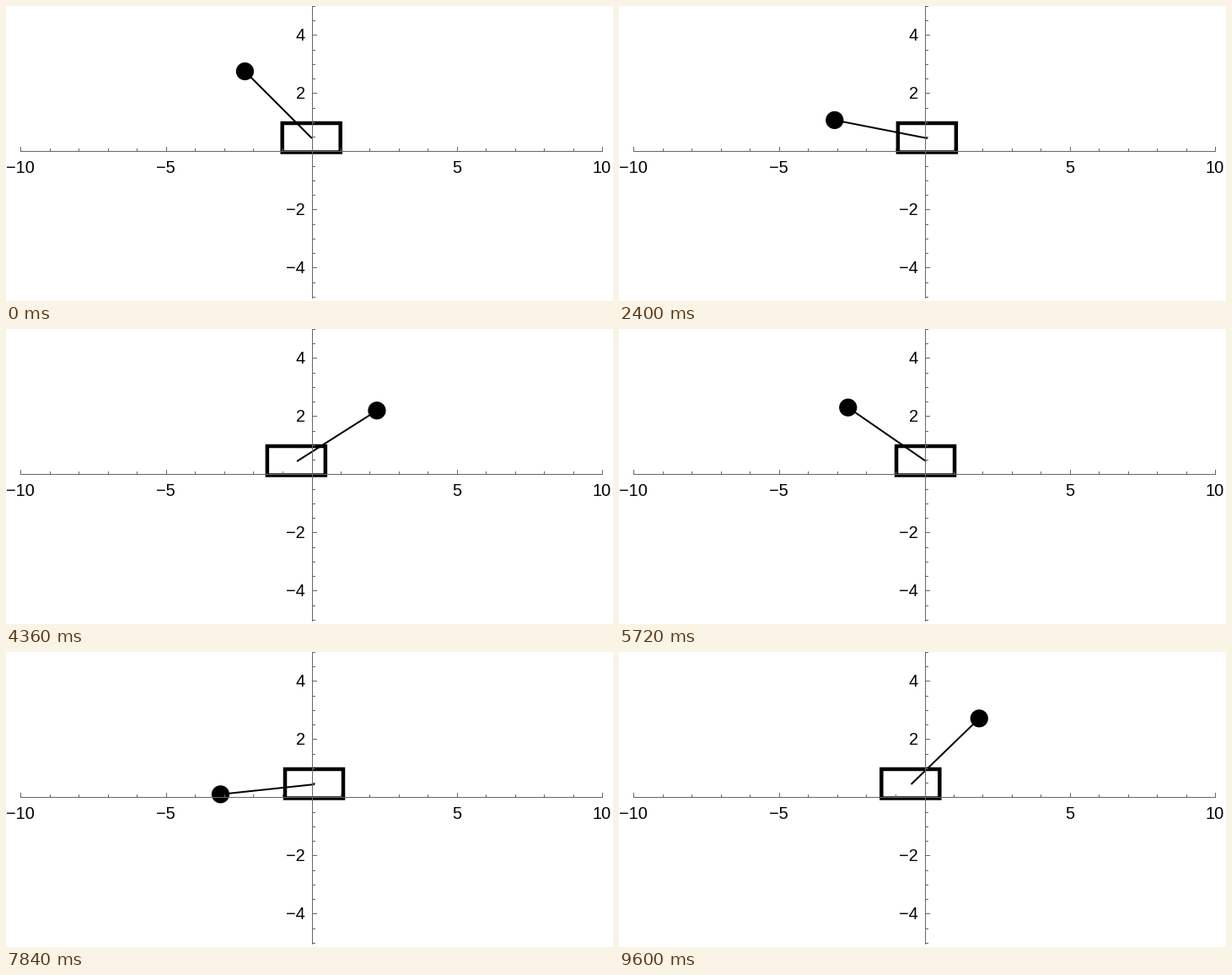
These frames come from a looping animation (720 px wide and 350 px high, 9.64 s). A matplotlib script:

```python
import numpy as np
import matplotlib.pyplot as plt
from matplotlib.animation import FuncAnimation
from matplotlib.patches import Circle, Rectangle

W, H, DPI = 720, 350, 100
PX = 72 / DPI                 # points per pixel
FRAMES, STEP = 241, 40
UNIT = 34.5                   # pixels per axis unit
OX, OY = 362.6, 172.9         # origin of the ticks in pixels
AXIS_X, AXIS_Y = 363.5, 172.5
GRAY = "0.4"

# Pendulum on a free cart, released at rest 45 degrees above the left horizon
MASS_RATIO = 1 / 3            # bob mass / total mass
AMP = np.radians(135)
PERIOD = 2760
SHIFT = UNIT * MASS_RATIO     # cart travel for a pendulum of unit length
LENGTH = 112.4                # drawn rod length
PIVOT_X, PIVOT_Y = 362.9, 157
BOB_R = 10.6
BOX_X, BOX_Y = 362.2, 173.5   # cart's bottom centre at the start


def swing_table(n=4000):
    """Time and angle over one full swing, from energy conservation."""
    psi = np.linspace(-np.pi / 2, 3 * np.pi / 2, n)
    s = np.sin(AMP / 2) * np.sin(psi)
    theta = 2 * np.arcsin(s)
    rate = np.sqrt((1 - MASS_RATIO * np.cos(theta) ** 2) / (1 - s ** 2))
    t = np.concatenate([[0], np.cumsum((rate[1:] + rate[:-1]) / 2)])
    return t / t[-1] * PERIOD, theta


TIMES, ANGLES = swing_table()

fig = plt.figure(figsize=(W / DPI, H / DPI), dpi=DPI, facecolor="white")
ax = fig.add_axes([0, 0, 1, 1])
ax.set_xlim(0, W)
ax.set_ylim(H, 0)
ax.axis("off")


def thin_line(x0, y0, x1, y1):
    ax.plot([x0, x1], [y0, y1], color=GRAY, lw=PX, zorder=5,
            solid_capstyle="butt", snap=False)


def label(x, y, value, ha):
    ax.text(x, y, str(value).replace("-", "\u2212"), ha=ha, va="baseline",
            family="Liberation Sans", fontsize=20 * PX, zorder=6)


def pixel(v):
    return np.floor(v) + 0.5


def tick_size(major):
    return 5.5 if major else 3.5


def draw_axes():
    thin_line(17, AXIS_Y, 708, AXIS_Y)
    thin_line(AXIS_X, 0, AXIS_X, 347)
    for i in range(-10, 11):
        if i == 0:
            continue
        x = pixel(OX + i * UNIT)
        major = i % 5 == 0
        thin_line(x, AXIS_Y, x, AXIS_Y - tick_size(major))
        if major:
            label(x - 1, 198, i, "center")

        y = pixel(OY - i * UNIT / 2)
        major = i % 4 == 0
        thin_line(AXIS_X, y, AXIS_X + tick_size(major), y)
        if major:
            label(354.7, y + 6.5, i // 2, "right")


draw_axes()
cart = ax.add_patch(Rectangle((0, BOX_Y - UNIT), 2 * UNIT, UNIT, fill=False,
                              ec="black", lw=4.5 * PX, zorder=2, snap=False))
rod, = ax.plot([], [], color="black", lw=2 * PX, zorder=3,
               solid_capstyle="butt", snap=False)
bob = ax.add_patch(Circle((0, 0), BOB_R, fc="black", ec="none", zorder=4))


def update(i):
    theta = np.interp(i * STEP % PERIOD, TIMES, ANGLES)
    # the common centre of mass stays put
    move = -SHIFT * (np.sin(theta) + np.sin(AMP))
    x = PIVOT_X + move
    bob_x = x + LENGTH * np.sin(theta)
    bob_y = PIVOT_Y + LENGTH * np.cos(theta)
    cart.set_x(BOX_X + move - UNIT)
    rod.set_data([x, bob_x], [PIVOT_Y, bob_y])
    bob.center = (bob_x, bob_y)
    return cart, rod, bob


anim = FuncAnimation(fig, update, frames=FRAMES, interval=STEP,
                     repeat=True, repeat_delay=0, blit=False)
plt.show()
```
